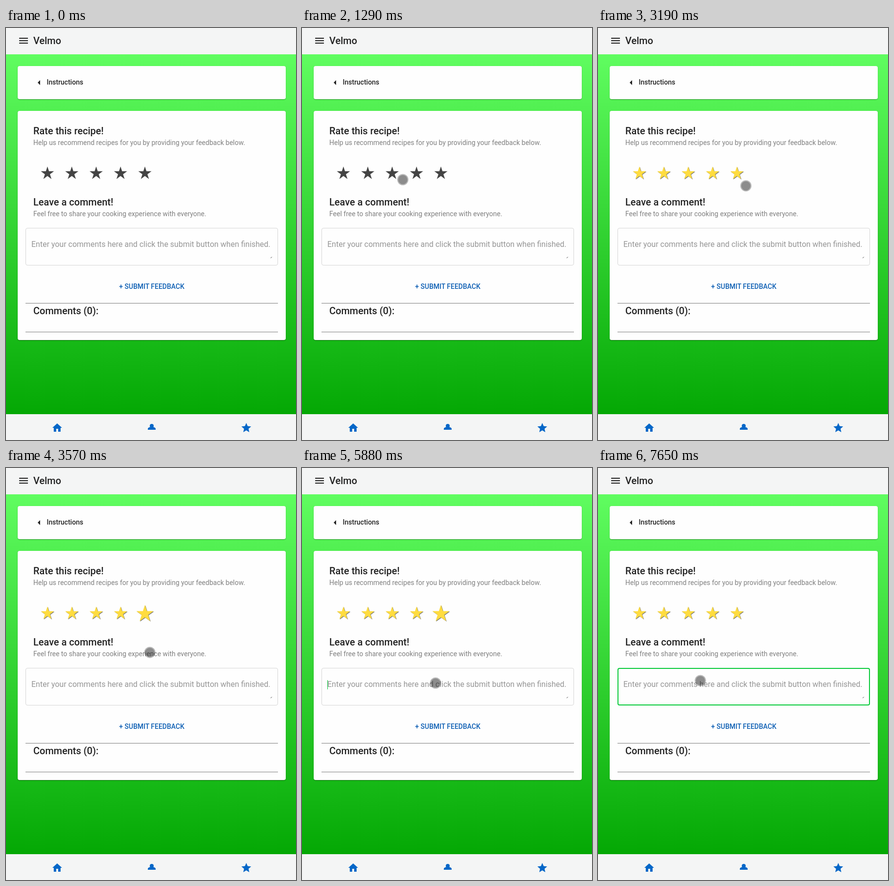
Write an HTML page that moves like this. It is 595 px wide and 845 px high and loops after 8000 ms.

```html
<!DOCTYPE html>
<html lang="en">
<head>
<meta charset="utf-8">
<title>Recipe feedback</title>
<style>
html, body { margin: 0; width: 100%; height: 100%; overflow: hidden; }
#stage {
  position: relative; width: 595px; height: 845px; overflow: hidden;
  background: linear-gradient(#60fd60 54px, #04a804 792px);
}
.bar { position: absolute; left: 0; width: 100%; background: #f4f5f5; }
.card {
  position: absolute; left: 24px; width: 550px; background: #fefefe; border-radius: 4px;
  box-shadow: 0 2px 1px -1px rgba(0,0,0,.2), 0 1px 1px rgba(0,0,0,.14), 0 1px 3px rgba(0,0,0,.12);
}
svg { position: absolute; left: 0; top: 0; }
text { font-family: Roboto, sans-serif; white-space: pre; }
.title { font-size: 20px; font-weight: 500; fill: #222; }
.sub { font-size: 14px; fill: #808080; }
.hint { font-size: 16px; fill: #969696; }
.label { font-size: 14px; font-weight: 500; }
.icon { fill: #0467c8; }
</style>
</head>
<body>
<div id="stage">
  <div class="bar" style="top:0;height:54px"></div>
  <div class="bar" style="top:792px;height:53px"></div>
  <div class="card" style="top:78px;height:68px"></div>
  <div class="card" style="top:170px;height:470px"></div>
  <svg width="595" height="845" viewBox="0 0 595 845">
    <path d="M27 20h18v2H27zM27 25h18v2H27zM27 30h18v2H27z" fill="#222"/>
    <text class="title" x="56" y="33">Velmo</text>
    <path d="M70 107l-5 5 5 5z" fill="#222"/>
    <text class="label" x="83.5" y="116" fill="#222">Instructions</text>

    <text class="title" x="56" y="218">Rate this recipe!</text>
    <text class="sub" x="56" y="240">Help us recommend recipes for you by providing your feedback below.</text>
    <g id="stars"></g>
    <text class="title" x="56" y="364">Leave a comment!</text>
    <text class="sub" x="56" y="386">Feel free to share your cooking experience with everyone.</text>

    <rect id="field" fill="none"/>
    <text class="hint" x="52" y="449">Enter your comments here and click the submit button when finished.</text>
    <path d="M543 472l2.5-2.5" stroke="#444"/>
    <rect id="caret" x="52" y="435" width="1" height="19" fill="#08cc3c"/>
    <text class="label" x="232" y="535" fill="#0d5fb4">+ SUBMIT FEEDBACK</text>

    <path d="M40 564.5h518M40 623.5h518" stroke="#7c7c7c"/>
    <text class="title" x="56" y="587">Comments (0):</text>

    <g class="icon">
      <path transform="translate(93 808)" d="M10 20v-6h4v6h5v-8h3L12 3 2 12h3v8z"/>
      <g transform="translate(299 816)">
        <circle r="4"/>
        <path d="M0 2C-2.67 2-8 3.34-8 6v2H8V6C8 3.34 2.67 2 0 2z"/>
      </g>
      <polygon id="tab" transform="translate(493 820.5)"/>
    </g>

    <g id="cursor">
      <circle r="11.5" fill-opacity=".27"/>
      <circle r="9.5" fill-opacity=".24"/>
    </g>
  </svg>
</div>
<script>
const LOOP = 8000, ENTER = 260, RATED = 3190, TAPPED = 5880, FOCUSED = 6390;
const $ = id => document.getElementById(id);
const clamp = v => Math.max(0, Math.min(1, v));
const linear = u => u;
const easeOut = u => 1 - (1 - u) ** 2;
const smooth = u => u * u * (3 - 2 * u);
const ramp = (t, start, length) => smooth(clamp((t - start) / length));

// Each move starts where the last one ended; "via" bends its path.
const origin = [511, 845];
const moves = [
  { from: 260, until: 820, to: [163, 317], via: [232, 446], ease: easeOut },
  { from: 1000, until: 1700, to: [280, 301], ease: smooth },
  { from: 2630, until: 2730, to: [299, 303], ease: linear },
  { from: 2960, until: 3880, to: [274, 441], via: [315, 335], ease: linear },
  { from: 6390, until: 7090, to: [210, 436], ease: smooth }
];

function cursorAt(t) {
  let pos = origin;
  for (const m of moves) {
    if (t < m.from) break;
    const k = m.ease(clamp((t - m.from) / (m.until - m.from)));
    pos = pos.map((a, i) => {
      const b = m.to[i], c = m.via ? m.via[i] : (a + b) / 2;
      return (1 - k) ** 2 * a + 2 * k * (1 - k) * c + k * k * b;
    });
  }
  return pos;
}

function set(el, attrs) {
  for (const name in attrs) el.setAttribute(name, attrs[name]);
}

function starPoints(radius, inner, cy) {
  return Array.from({ length: 10 }, (_, i) => {
    const r = i % 2 ? radius * inner : radius, a = i * Math.PI / 5;
    return [r * Math.sin(a), cy - r * Math.cos(a)].map(v => v.toFixed(2)).join();
  }).join(' ');
}

function addStar() {
  const el = document.createElementNS('http://www.w3.org/2000/svg', 'polygon');
  set(el, { points: starPoints(14.2, .382, 3.2) });
  $('stars').append(el);
  return el;
}

const stars = Array.from({ length: 5 }, (_, i) => ({
  x: 85 + i * 50, shadow: addStar(), face: addStar()
}));
set($('tab'), { points: starPoints(10.5, .46, 0) });

function draw(t) {
  const rated = t >= RATED, focused = t >= FOCUSED;
  const grow = ramp(t, RATED, 200) - ramp(t, FOCUSED, 200);
  stars.forEach((s, i) => {
    const scale = i === 4 ? 1 + .3 * grow : 1;
    const place = d => `translate(${s.x + d} ${295 + d}) scale(${scale})`;
    set(s.shadow, { transform: place(1), fill: rated ? '#777' : 'none' });
    set(s.face, { transform: place(0), fill: rated ? '#ffdc40' : '#444' });
  });

  const w = focused ? 2 : 1;
  set($('field'), {
    x: 40 + w / 2, y: 410 + w / 2, width: 518 - w, height: 77 - w, rx: 4 - w / 2,
    stroke: focused ? '#0acb3c' : '#d6d6d6', 'stroke-width': w
  });
  const caretOn = (t >= TAPPED && t < FOCUSED) || (t >= 7240 && t < 7650);
  set($('caret'), { opacity: +caretOn });

  const [x, y] = cursorAt(t);
  set($('cursor'), { transform: `translate(${x} ${y})`, opacity: +(t >= ENTER) });
}

const start = performance.now();
function tick() {
  draw((performance.now() - start) % LOOP);
  requestAnimationFrame(tick);
}
tick();
</script>
</body>
</html>
```
